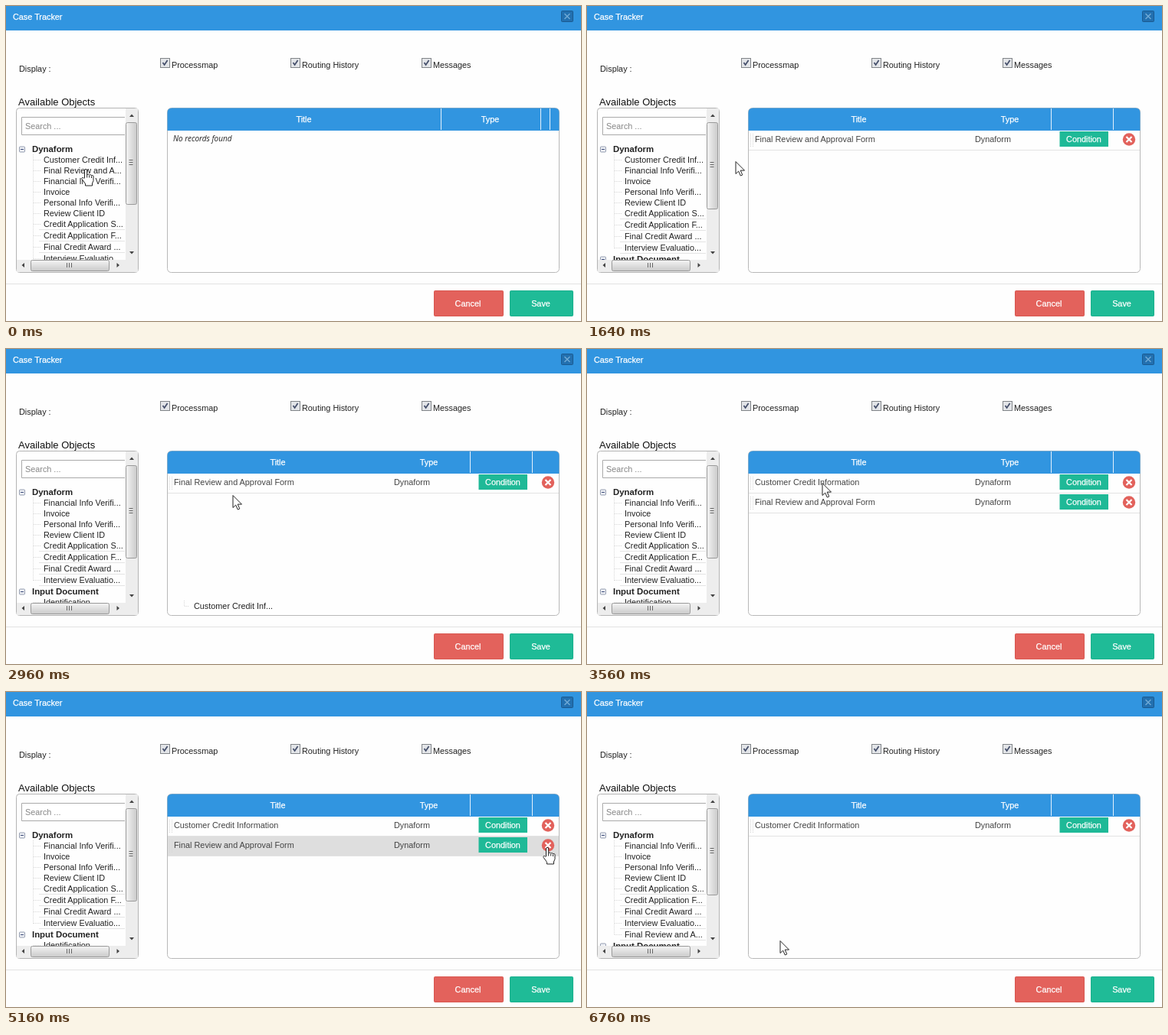
Write an HTML page that moves like this. It is 750 px wide and 412 px high and loops after 6800 ms.

```html
<!DOCTYPE html>
<html lang="en">
<head>
<meta charset="utf-8">
<title>Case Tracker</title>
<style>
html, body { margin: 0; width: 100%; height: 100%; overflow: hidden; background: #fefefe; }
svg { display: block; width: 750px; height: 412px; }
text { font: 10.85px "Liberation Sans", Arial, sans-serif; fill: #222; white-space: pre; }
.mid { text-anchor: middle; }
.light { fill: #fff; stroke: #fff; stroke-width: .25px; }
.bold { font-weight: bold; font-size: 11.4px; }
.head { font-size: 13px; fill: #111; }
.none { font: italic 10px "Open Sans", "Noto Sans", sans-serif; }
.cell { fill: #444; }
.grip { stroke: #666; fill: none; }
.tree { stroke: #d8d8d8; fill: none; stroke-dasharray: 1 1; }

[class^="at-"], #mover { animation: 6800ms step-end infinite; }
#mover { animation-name: move; }
.at-list-a { animation-name: list-a; }
.at-list-b { animation-name: list-b; }
.at-list-c { animation-name: list-c; }
.at-list-d { animation-name: list-d; }
.at-empty { animation-name: empty; }
.at-filled { animation-name: filled; }
.at-final { animation-name: final; }
.at-customer { animation-name: customer; }
.at-second { animation-name: second; }
.at-hover { animation-name: hover; }
.at-drag1 { animation-name: drag1; }
.at-drag2 { animation-name: drag2; }
.at-hand { animation-name: hand; }
.at-arrow { animation-name: arrow; }

@keyframes list-a { 0% { opacity: 1 } 6.47%, 100% { opacity: 0 } }
@keyframes list-b { 0% { opacity: 0 } 6.47% { opacity: 1 } 32.941%, 100% { opacity: 0 } }
@keyframes list-c { 0% { opacity: 0 } 32.941% { opacity: 1 } 87.647%, 100% { opacity: 0 } }
@keyframes list-d { 0% { opacity: 0 } 87.647%, 100% { opacity: 1 } }
@keyframes empty { 0% { opacity: 1 } 21.176%, 100% { opacity: 0 } }
@keyframes filled { 0% { opacity: 0 } 21.176%, 100% { opacity: 1 } }
@keyframes final { 0% { opacity: 0 } 21.176% { opacity: 1 } 50.588%, 100% { opacity: 0 } }
@keyframes customer { 0% { opacity: 0 } 50.588%, 100% { opacity: 1 } }
@keyframes second { 0% { opacity: 0 } 50.588% { opacity: 1 } 87.647%, 100% { opacity: 0 } }
@keyframes hover { 0% { opacity: 0 } 71.176% { opacity: 1 } 87.647%, 100% { opacity: 0 } }
@keyframes drag1 { 0% { opacity: 0 } 6.47% { opacity: 1 } 21.176%, 100% { opacity: 0 } }
@keyframes drag2 { 0% { opacity: 0 } 32.941% { opacity: 1 } 50.588%, 100% { opacity: 0 } }
@keyframes hand {
  0%, 30%, 72.941% { opacity: 1 }
  6.47%, 32.941%, 87.647%, 100% { opacity: 0 }
}
@keyframes arrow {
  0%, 30%, 72.941% { opacity: 0 }
  6.47%, 32.941%, 87.647%, 100% { opacity: 1 }
}
@keyframes move {
  0% { transform: translate(104px, 214px) }
  0.588% { transform: translate(112px, 214px) }
  2.352% { transform: translate(119px, 214px) }
  6.47% { transform: translate(142px, 221px) }
  8.235% { transform: translate(196px, 225px) }
  9.411% { transform: translate(244px, 220px) }
  11.176% { transform: translate(282px, 206px) }
  12.352% { transform: translate(302px, 189px) }
  14.117% { transform: translate(310px, 174px) }
  15.882% { transform: translate(306px, 170px) }
  17.058% { transform: translate(303px, 166px) }
  21.176% { transform: translate(288px, 174px) }
  22.941% { transform: translate(241px, 191px) }
  24.117% { transform: translate(194px, 204px); animation-timing-function: steps(2) }
  27.058% { transform: translate(120px, 204px); animation-timing-function: steps(2) }
  30% { transform: translate(100px, 201px) }
  32.941% { transform: translate(110px, 206px) }
  34.705% { transform: translate(140px, 218px) }
  35.882% { transform: translate(180px, 222px) }
  37.647% { transform: translate(224px, 218px) }
  38.823% { transform: translate(257px, 210px); animation-timing-function: steps(3) }
  43.529% { transform: translate(296px, 192px); animation-timing-function: steps(2) }
  46.47% { transform: translate(300px, 172px) }
  47.647% { transform: translate(301px, 167px) }
  52.352% { transform: translate(307px, 176px) }
  53.529% { transform: translate(322px, 191px); animation-timing-function: steps(2) }
  56.47% { transform: translate(382px, 222px); animation-timing-function: steps(2) }
  59.411% { transform: translate(436px, 232px); animation-timing-function: steps(4) }
  65.294% { transform: translate(580px, 231px); animation-timing-function: steps(3) }
  70% { transform: translate(690px, 220px) }
  71.176% { transform: translate(702px, 212px) }
  72.941% { transform: translate(706px, 207px) }
  75.882% { transform: translate(706px, 204px) }
  87.647% { transform: translate(704px, 206px) }
  88.823% { transform: translate(680px, 218px); animation-timing-function: steps(2) }
  91.764% { transform: translate(550px, 264px); animation-timing-function: steps(2) }
  94.705% { transform: translate(365px, 312px) }
  96.47% { transform: translate(284px, 325px) }
  97.647% { transform: translate(255px, 328px) }
  99.411%, 100% { transform: translate(252px, 326px) }
}
</style>
</head>
<body>
<svg viewBox="0 0 750 412">
  <defs>
    <linearGradient id="bar"><stop stop-color="#f4f4f4"/><stop offset="1" stop-color="#cacaca"/></linearGradient>
    <linearGradient id="barH" x2="0" y2="1"><stop stop-color="#f4f4f4"/><stop offset="1" stop-color="#cacaca"/></linearGradient>
    <clipPath id="tree"><path d="M14 134H156V332H14Z"/></clipPath>
    <g id="check">
      <rect x=".5" y=".5" width="12" height="12" fill="#e3e5e8" stroke="#808488"/>
      <path d="M3.5 6L5.6 9L9.6 3" fill="none" stroke="#46506c" stroke-width="1.8"/>
    </g>
    <g id="minus">
      <rect x="17.5" y="-3.5" width="7" height="7" rx="1" fill="#eef0f5" stroke="#949db0"/>
      <path d="M19 0H23" stroke="#3a4a78"/>
    </g>
    <g id="row">
      <path d="M211 188.5H721" stroke="#e3e3e3"/>
      <path d="M213.5 167V184M216.5 167V184" stroke="#d6d6d6" stroke-dasharray="1 1"/>
      <text class="cell" x="506" y="178">Dynaform</text>
      <rect x="616.5" y="164" width="63.5" height="20" fill="#1fb997"/>
      <text class="mid light" x="648" y="178">Condition</text>
      <circle cx="707" cy="174.5" r="8.2" fill="#e2625c"/>
      <path d="M703.5 171l7 7m0-7l-7 7" stroke="#fff" stroke-width="2.2"/>
    </g>
    <path id="elbow" class="tree" d="M-12.5 137V144.5H-7"/>
  </defs>

  <rect width="750" height="412" fill="#fefefe"/>
  <rect width="750" height="32" fill="#3195e0"/>
  <text class="light" x="9" y="18">Case Tracker</text>
  <rect x="724.5" y="6.5" width="15" height="14" rx="1" fill="#2270b0" stroke="#1b5a90"/>
  <path d="M728.5 10l7 7m0-7l-7 7" stroke="#6fa9d6" stroke-width="1.5"/>

  <text x="17" y="86">Display :</text>
  <use href="#check" x="201" y="68"/><text x="216" y="81">Processmap</text>
  <use href="#check" x="371" y="68"/><text x="386" y="81">Routing History</text>
  <use href="#check" x="542" y="68"/><text x="557" y="81">Messages</text>

  <text class="head" x="16" y="130">Available Objects</text>
  <rect x="13.5" y="133.5" width="159" height="215" rx="4" fill="#fefefe" stroke="#b4b4b4"/>
  <path d="M156 134H172V348H14V332H156Z" fill="#ededed"/>
  <path d="M155 145.5H20.5V168.5H155" fill="#fff" stroke="#a9a9a9"/>
  <text x="25" y="161" style="fill:#888">Search ...</text>
  <use href="#minus" y="187.5"/>
  <text class="bold" x="34" y="191">Dynaform</text>
  <path d="M161 145h6l-3-3.500zM161 321h6l-3 3.500zM24 336v6l-3.500-3zM144.500 336v6l3.500-3z" fill="#444"/>
  <rect x="32.5" y="332.5" width="102" height="14" rx="2" fill="url(#barH)" stroke="#999"/>
  <path class="grip" d="M79.5 336v6m3-6v6m3-6v6"/>
  <g id="lists"></g>

  <rect x="210.5" y="133.5" width="511" height="215" rx="5" fill="#fefefe" stroke="#b8b8b8"/>
  <path d="M210.5 163V139a5.5 5.5 0 0 1 5.5-5.5H716a5.500 5.500 0 0 1 5.500 5.500V163Z" fill="#3195e0"/>
  <g class="at-empty">
    <path d="M567.5 134V162M697.5 134V162M709.5 134V162" stroke="#e4f1fc"/>
    <text class="mid light" x="388.5" y="152">Title</text>
    <text class="mid light" x="631.5" y="152">Type</text>
    <text class="none" x="218" y="177">No records found</text>
  </g>
  <g class="at-filled">
    <path d="M605.5 134V162M686.5 134V162" stroke="#e4f1fc"/>
    <text class="mid light" x="354.5" y="152">Title</text>
    <text class="mid light" x="551.5" y="152">Type</text>
    <use href="#row"/>
  </g>
  <g class="at-final"><text class="cell" x="219" y="178">Final Review and Approval Form</text></g>
  <g class="at-customer"><text class="cell" x="219" y="178">Customer Credit Information</text></g>
  <g class="at-hover"><rect x="211" y="189" width="510" height="25" fill="#dedede"/></g>
  <g class="at-second">
    <use href="#row" y="26"/>
    <text class="cell" x="219" y="204">Final Review and Approval Form</text>
  </g>

  <path d="M0 363.5H750" stroke="#e2e2e2"/>
  <rect x="558.5" y="372.5" width="90" height="33" rx="1" fill="#e3625c" stroke="#d8564f"/>
  <text class="mid light" x="602.5" y="393">Cancel</text>
  <rect x="657.5" y="372.5" width="82" height="33" rx="1" fill="#1fbb97" stroke="#1ab08d"/>
  <text class="mid light" x="697.5" y="393">Save</text>

  <g id="mover">
    <g class="at-drag1"><use href="#elbow" x="-70"/><text x="-70" y="148">Final Review and A...</text></g>
    <g class="at-drag2"><use href="#elbow" x="-51"/><text x="-51" y="148">Customer Credit Inf...</text></g>
    <path class="at-arrow" d="M0-.5V15.500L3.700 12.100L6.300 18L8.800 16.900L6.200 11.100H11.500Z" fill="#fff" stroke="#222"/>
    <path class="at-hand" d="M-1.500 11V1a1.600 1.600 0 0 1 3.200 0V7a1.600 1.600 0 0 1 3 .4a1.500 1.500 0 0 1 2.800.6a1.400 1.400 0 0 1 2.500 1V14.500L8.500 18V21H-.5V18.500L-4.800 12.500C-6 10.500-3.500 9.500-2.500 11.300Z M1.700 7V10.500M4.700 8V10.500M7.500 8.500V11" fill="#fff" stroke="#222"/>
  </g>
</svg>
<script>
const customer = "Customer Credit Inf...", review = "Final Review and A...";
const plain = ["Financial Info Verifi...", "Invoice", "Personal Info Verifi...", "Review Client ID"];
const ruled = ["Credit Application S...", "Credit Application F...", "Final Credit Award ...", "Interview Evaluatio..."];

function list(name, top, bottom, thumb) {
  let y = 201, out = "";
  const item = (label, rule) => {
    out += `<text x="49" y="${y + 4}">${label}</text><path class="tree" d="M36 ${y + .5}H46"/>`;
    if (rule) out += `<path d="M43 ${y + 7.5}H155" stroke="#e4e4e4"/>`;
    y += rule ? 15 : 14;
  };
  top.forEach(s => item(s, false));
  bottom.forEach(s => item(s, true));
  out += `<path class="tree" d="M35.5 194V${y - 14}"/>
    <use href="#minus" y="${y + .5}"/><text class="bold" x="34" y="${y + 4}">Input Document</text>`;
  y += 14;
  item("Identification", false);
  const mid = 151.5 + Math.floor(thumb / 2);
  return `<g class="at-list-${name}"><g clip-path="url(#tree)">${out}</g>
    <rect x="156.5" y="152.5" width="14" height="${thumb}" rx="2" fill="url(#bar)" stroke="#999"/>
    <path class="grip" d="M160.5 ${mid - 3}h5m-5 3h5m-5 3h5"/></g>`;
}

document.getElementById("lists").innerHTML =
  list("a", [customer, review, ...plain], ruled, 107) +
  list("b", [customer, ...plain], ruled, 113) +
  list("c", plain, ruled, 121) +
  list("d", plain, [...ruled, review], 113);
</script>
</body>
</html>
```
